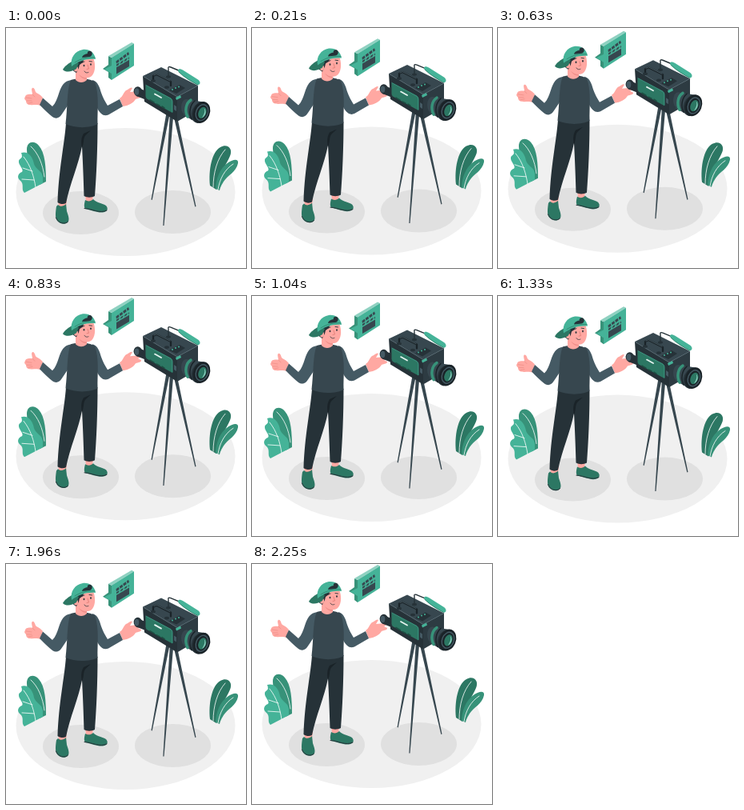
Recreate the animation shown at these times as an HTML page. Size 300 px wide and 300 px high, loop 2.29 s.

```html
<!DOCTYPE html>
<html lang="en">
<head>
<meta charset="utf-8">
<title>Presenter and camera</title>
<style>
  html, body { margin: 0; width: 100%; height: 100%; overflow: hidden; background: #fff; }
  svg { display: block; width: 100%; height: 100%; }
  .skin { fill: #ffa8a2; }
  .ink { fill: #263238; }
  .night { fill: #1a2328; }
  .slate { fill: #37474f; }
  .steel { fill: #455a64; }
  .mint { fill: #8fd1c1; }
  .green { fill: #45b398; }
  .mid { fill: #379279; }
  .deep { fill: #2c7763; }
  .line { fill: none; stroke-linecap: round; stroke-linejoin: round; }
</style>
</head>
<body>
<svg viewBox="0 0 300 300">
  <g id="scene">
    <ellipse cx="149.5" cy="205" rx="137" ry="80" fill="#f0f0f0"/>
    <g fill="#e0e0e0">
      <ellipse cx="93.5" cy="231" rx="47.5" ry="27"/>
      <ellipse cx="208.5" cy="230" rx="47.5" ry="27"/>
    </g>

    <g id="plants">
      <path class="mid" d="M34 190C34 178 26 166 26 152C26 142 35 140 41 147C49 156 50 174 50 192L42 196Z"/>
      <path class="green" d="M23 206C18 202 24 195 17 190C13 186 16 181 20 180C23 177 15 171 16 166C17 162 22 164 19 156C28 153 34 162 35 170C37 177 45 178 46 186V194Z"/>
      <path class="deep" d="M255 197C253 178 257 155 268 149C277 144 284 151 280 160C276 170 264 185 263 202Z"/>
      <path class="mid" d="M262 201C262 190 267 175 278 168C284 164 291 163 290 169C288 180 277 184 272 192C269 197 268 199 267 203Z"/>
      <g class="line" stroke="#fff" stroke-width=".8">
        <path d="M31 148C40 156 46 170 48 186M22 161C31 172 35 186 37 199M21 175L33 179M20 189L35 190"/>
        <path d="M274 152C264 163 259 181 259 199M284 170C273 177 267 189 265 202"/>
      </g>
    </g>

    <g id="man">
      <path class="skin" d="M65 214H76L75 224H66ZM99 207H109L108 217H100Z"/>
      <path class="deep" d="M65 221C68 224 72 223 75 220L76 229C78 235 80 240 77 243C74 246 67 245 64 241C61 237 62 230 63 223Z"/>
      <path class="deep" d="M99 215C102 217 106 217 109 214C114 219 121 219 125 222C128 225 127 229 123 230C116 232 109 228 99 226C97 223 98 219 99 215Z"/>
      <path class="line" stroke="#263238" d="M62.500 237C65 244.500 74 246 77.500 242M98 225.500C108 226 117 232.500 126 228"/>
      <path class="ink" d="M75 119C73 146 66 176 64.500 218C68 220.500 72 220.500 75 219C80 194 91 170 95 148C96 166 97 190 97.500 210C102 212.500 107 212 111 210C113 185 114.500 151 114.500 119Z"/>
      <path class="night" d="M106 128L97 132C94 137 93.500 142 95 150C98 143 96 137 100 133.500Z"/>

      <path class="skin" d="M46 87C43 83 39 82 37 80C36 77 35 74 33 75C31 76 33 80 33 83C29 82 24 83 24 86C22 88 24 90 25 91C25 94 27 96 30 96C34 97 38 95 43 97Z"/>
      <path class="line" stroke="#e98980" stroke-width=".6" d="M25 87L32 88M26 91L32 91M28 94L33 93M33 83L36 86"/>
      <path class="skin" d="M142 88C146 86 147 80 150 78C153 77 156 73 158 75L155 80L166 79C169 80 168 82 165 83L169 85C170 87 165 88 162 89C159 94 153 97 146 98Z"/>

      <path class="steel" d="M82 65C72 66 69 73 66 82C64 88 62 94 58 98L46 87.500L42 96C47 101 53 107 58 111C64 115 68 111 71 106L79 94ZM108 65C115 67 117 74 119 81C121 87 124 92 127 97L142 89L146 98L128 108.500C122 111 118 107 115 102L109 90Z"/>
      <path class="slate" d="M81 65C76 76 77 101 74.500 120C86 125.500 105 125.500 114.500 120C114 104 117 84 111 67C104 63 90 62 81 65Z"/>

      <path class="skin" d="M87 51L101 58L101 65C97 69 91 69 87 65Z"/>
      <path fill="#ef8f8a" d="M91 58L101 61V64C96 64 93 61 91 58Z"/>
      <path class="skin" d="M85 43L109 37C112 45 112 53 108 59C104 64 96 63 91 58L86 53Z"/>
      <path class="ink" d="M81 46L98 38L96 43L92 46L91 50L88 56C84 54 81 51 81 46Z"/>
      <ellipse class="skin" cx="87.500" cy="51" rx="2.6" ry="3.6"/>
      <path class="deep" d="M84 41C78 44 73 48 71 52C75 56 82 55 88 51L91 44Z"/>
      <path class="green" d="M82 48C80 37 86 29 96 27C104 26 111 31 112 39C102 38 91 41 82 48Z"/>
      <path class="ink" d="M95 37C96 33.500 99 32.500 102 32C101 29.500 104 28 106 29C109 31 108 35.500 104 36Z"/>
      <path class="line" stroke="#2c7763" stroke-width=".7" d="M86 43C94 38 103 36 111 37"/>
      <ellipse class="ink" cx="97.500" cy="47" rx=".9" ry="1.3"/>
      <ellipse class="ink" cx="106" cy="45.500" rx=".9" ry="1.3"/>
      <path class="line" stroke="#263238" stroke-width=".9" d="M94.500 43.500L98 42M104 41.500L107.500 42"/>
      <path class="line" stroke="#d9736c" stroke-width=".7" d="M102 46L103.500 51L101 51.500"/>
      <path class="line" stroke="#263238" stroke-width=".7" d="M98 54C99 56 101 56.500 103 55.500"/>
    </g>

    <g id="bubble">
      <path class="mid" d="M128 35L132 37V65L128 62V55L121 51L128 46Z"/>
      <path class="mint" d="M128 35L157 18L160 19.500L132 37Z"/>
      <path class="green" d="M132 37L160 19.500V47L132 65V57L123 51.500L132 47Z"/>
      <path class="slate" d="M138 45.500L154 36V48L138 57.500Z"/>
      <path class="slate" d="M137.500 41.500L153 30L154 33L138 44.500Z"/>
      <path class="line" stroke="#45b398" stroke-width="1.300" stroke-linecap="butt" d="M138 48.500L154 39M141 38L142.500 42.500M145.500 35L147 39M150 31.500L151.500 36M143 42L141 47M148 39L146 44M153 36L151 41"/>
    </g>

    <g id="camera">
      <path class="slate" d="M200.500 106H205L182.700 215L181.500 214.500ZM205 106H209.500L197.500 247H196.300ZM208.500 106H213L237.500 223L236.300 223.500Z"/>

      <path class="ink" d="M163 74L178 80V91L163 85Z"/>
      <ellipse class="ink" cx="165" cy="79.500" rx="5.300" ry="6.300" transform="rotate(-15 165 79.500)"/>
      <ellipse class="steel" cx="163.500" cy="79.500" rx="2.800" ry="4.200"/>

      <path class="slate" d="M171 60L194 49L240 72L214 86Z"/>
      <path class="ink" d="M171 60L214 86V117L173 92Z"/>
      <path fill="#2d3b42" d="M214 86L240 72V102L214 117Z"/>
      <path class="line" stroke="#50656f" stroke-width=".6" d="M171.500 60.500L214 86L240 72"/>
      <path class="deep" d="M174.500 71.500L206 88Q208 89.500 208 92V106L176 88.500Q174.500 87 174.500 85Z"/>
      <path class="line" stroke="#45b398" stroke-width=".7" d="M175 71.500L206 88Q208 89.500 208 92V105"/>
      <path class="line" stroke="#e5f3ef" stroke-width="1.800" d="M186 82.500L194 87"/>
      <path class="line" stroke="#1d4f42" stroke-width="1.600" d="M180 90L185 93M188 95L192 97M195 98L198 100"/>
      <path class="steel" d="M210 96L213 98V104L210 102Z"/>
      <path class="green" d="M212 87L218 84L219 87L213 90Z"/>

      <path class="line" stroke="#1a2328" stroke-width="2.300" d="M184 65V60L188 58L206 67V72"/>
      <path class="line" stroke="#607780" stroke-width=".6" d="M185 59L188 57.500L205 66"/>
      <g class="ink">
        <ellipse cx="184" cy="66" rx="3" ry="1.800"/>
        <ellipse cx="201" cy="74" rx="3" ry="1.800"/>
        <path d="M204 78L217 71L224 75L213 82Z"/>
      </g>
      <g class="green">
        <circle cx="208" cy="77" r="1"/>
        <circle cx="212" cy="75" r="1"/>
        <circle cx="216" cy="73.500" r="1"/>
      </g>
      <path class="line" stroke="#263238" stroke-width="1.400" d="M203 61V51Q202 47.500 206 49L218 54"/>
      <ellipse class="ink" cx="203" cy="61" rx="3" ry="1.700"/>
      <path class="green" d="M215 52.500C216 50.500 218 51 221 52.500L240 64.500C244 67.500 243 71.500 239 71C233 68 223 62 217 56Q214.500 54 215 52.500Z"/>
      <path class="line" stroke="#2c7763" stroke-width=".8" d="M216 55C223 62 233 67.500 239.500 71"/>

      <path class="slate" d="M225 89L250 93L240 119L222 109Z"/>
      <ellipse class="slate" cx="225" cy="99" rx="6" ry="10"/>
      <path class="line" stroke="#379279" stroke-width="3.500" stroke-linecap="butt" d="M231 90C225 94 223 103 227 111"/>
      <path class="line" stroke="#1a2328" stroke-width="1.500" d="M236 91C230 96 228 106 232 114"/>
      <g transform="translate(244.500 105.500) rotate(22)">
        <ellipse class="ink" cx="-2" cy="1" rx="10" ry="13.500"/>
        <ellipse class="night" rx="10.300" ry="13.800"/>
        <ellipse class="steel" cx=".5" rx="8" ry="11"/>
        <ellipse class="night" cx=".5" rx="6.600" ry="9.500"/>
        <ellipse class="deep" cx="1" rx="4.800" ry="7.500"/>
        <path class="mint" d="M1 -6C6 -4 6 3 3 6C4 1 4 -3 1 -6Z"/>
      </g>
    </g>
  </g>
</svg>
<script>
  const LOOP = 2290, STEPS = 55, BOB = 1500;
  const lift = (id, dy) =>
    document.getElementById(id).setAttribute('transform', `translate(0 ${-dy})`);

  function draw(now) {
    const step = Math.floor((now % LOOP) / LOOP * STEPS);
    const phase = (step * LOOP / STEPS) % BOB / BOB;
    const rise = 1 - Math.abs(1 - 2 * phase); // linear up and down
    lift('scene', 5 * rise);
    lift('camera', 5.5 * rise);
    lift('bubble', 12 * rise);
    requestAnimationFrame(draw);
  }
  draw(performance.now());
</script>
</body>
</html>
```
